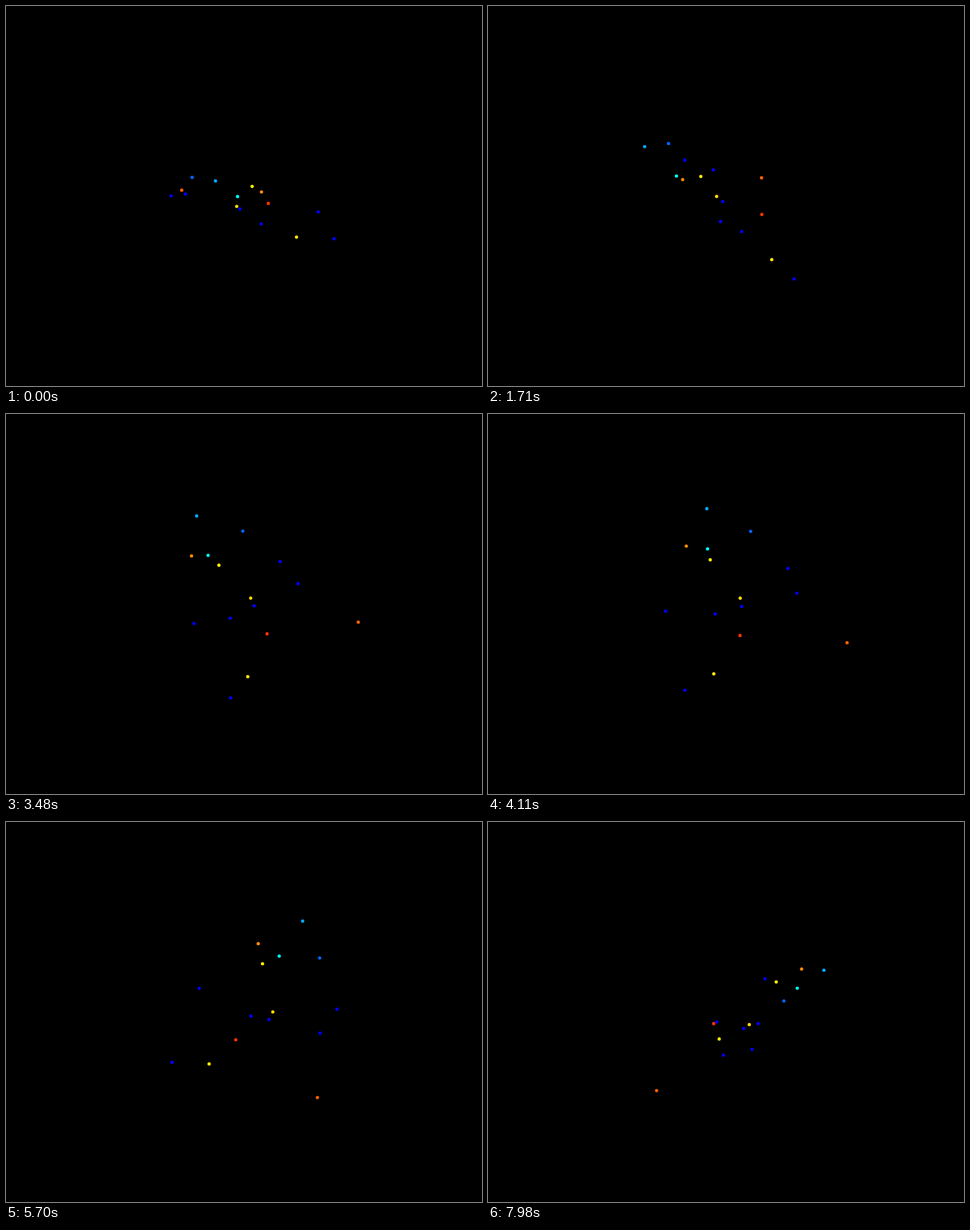
Animation, 837 px wide and 669 px high, one loop 8 s. Source, as an HTML page with a canvas:

```html
<!DOCTYPE html>
<html lang="en">
<head>
<meta charset="utf-8">
<title>Rotating points</title>
<style>
  html, body { margin: 0; width: 100%; height: 100%; overflow: hidden; background: #000; }
  canvas { display: block; }
</style>
</head>
<body>
<canvas id="stage" width="837" height="669"></canvas>
<script>
const ctx = document.getElementById('stage').getContext('2d');

const LOOP = 8000, STEP = 30;            // ms; the view turns one degree per step
const CENTER = { x: 436, y: 330.9 };
const DISTANCE = 2784;                   // camera distance in pixels
const RADIUS = 2.9;
const RAD = Math.PI / 180;
const SIN_ELEV = Math.sin(30 * RAD), COS_ELEV = Math.cos(30 * RAD);

// right, toward the viewer, up, colour
const points = [
  [-27.6, 104.3, 55.2, '#00ffff'],
  [-63.3, 145, 108.5, '#00aaff'],
  [-104.8, 73.4, 74.9, '#0066ff'],
  [-3.1, 70.1, 55.4, '#fff000'],
  [12.6, 115.9, 70.8, '#ff8c00'],
  [25.7, -38, -41.5, '#ff3300'],
  [-134.5, -144.9, -75.4, '#ff6000'],
  [-30.2, 21.2, -13, '#ffd800'],
  [76.8, -25.4, -104.7, '#ffe600'],
  [-24.8, 11.8, -23.8, '#0000ff'],
  [144.8, -25.9, -108.4, '#0000ff'],
  [12.7, 40.6, -37, '#0000ff'],
  [-144.7, 17, 6.2, '#0000ff'],
  [-121.8, -29.8, -17.3, '#0000ff'],
  [110.9, 60.7, -0.6, '#0000ff']
];

function project([right, front, up, color], angle) {
  const c = Math.cos(angle), s = Math.sin(angle);
  const across = right * c - front * s;
  const near = front * c + right * s;
  const depth = near * COS_ELEV + up * SIN_ELEV;
  const scale = DISTANCE / (DISTANCE - depth);
  return {
    x: CENTER.x + across * scale,
    y: CENTER.y + (near * SIN_ELEV - up * COS_ELEV) * scale,
    depth, color
  };
}

function draw(time) {
  const angle = Math.floor((time % LOOP) / STEP) * RAD;
  ctx.fillStyle = '#000';
  ctx.fillRect(0, 0, 837, 669);
  const dots = points.map(p => project(p, angle)).sort((a, b) => a.depth - b.depth);
  for (const { x, y, color } of dots) {
    ctx.fillStyle = color;
    ctx.beginPath();
    ctx.arc(x, y, RADIUS, 0, 2 * Math.PI);
    ctx.fill();
  }
}

let start;
function tick(now) {
  start ??= now;
  draw(now - start);
  requestAnimationFrame(tick);
}
draw(0);
requestAnimationFrame(tick);
</script>
</body>
</html>
```
